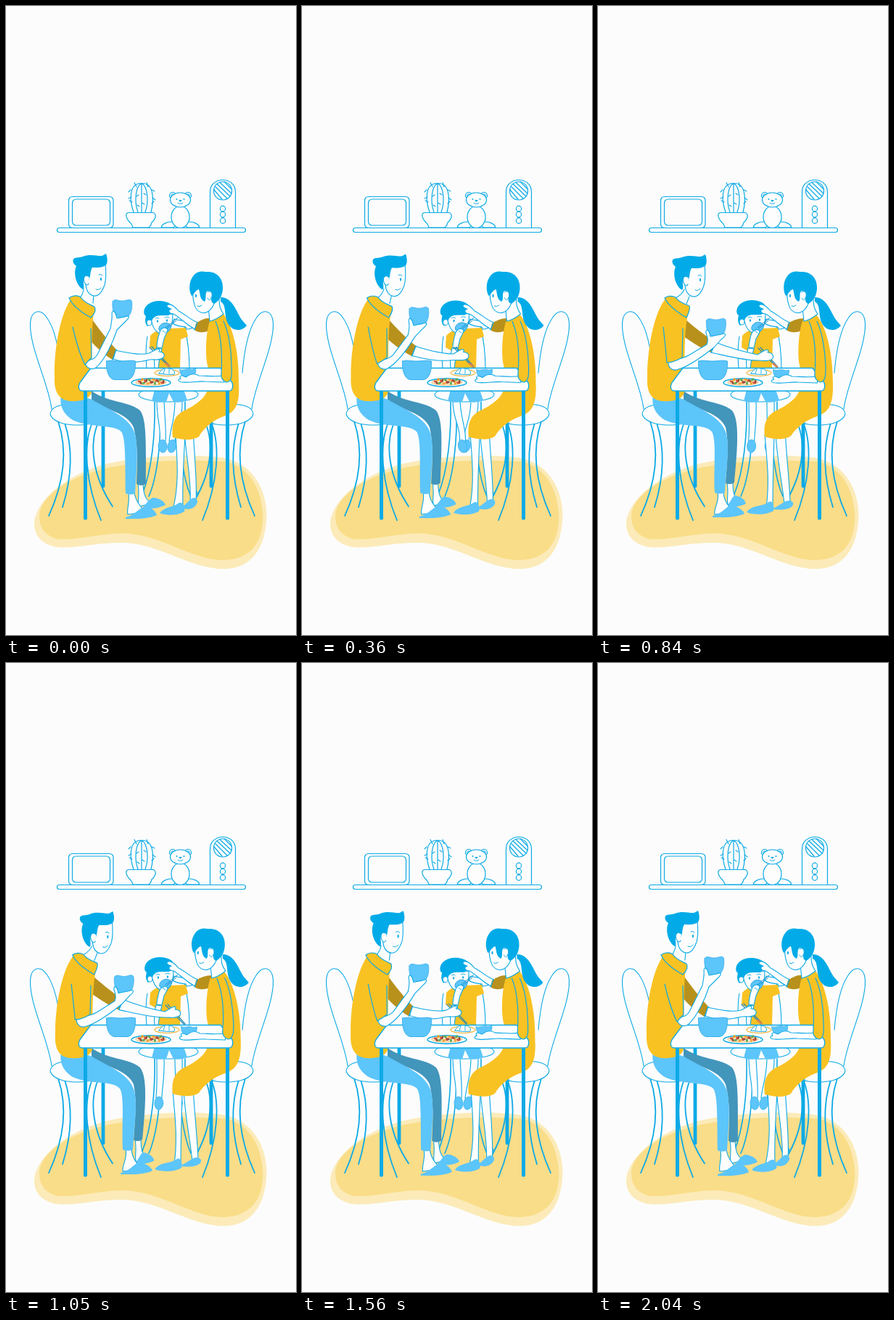
An HTML page with a canvas for the animation above (2070 ms loop, 400 px wide and 866 px high).

```html
<!DOCTYPE html>
<html lang="en">
<head>
<meta charset="utf-8">
<title>Family dinner</title>
<style>
html, body { margin: 0; width: 100%; height: 100%; overflow: hidden; background: #fcfcfc; }
canvas { display: block; width: 400px; height: 866px; }
</style>
</head>
<body>
<canvas id="stage"></canvas>
<script>
const LOOP = 2070;
const LINE = '#0daae6', HAIR = '#02abe8', SKY = '#5cc5fa', STEEL = '#4295bb';
const GOLD = '#f9c223', DARK = '#b8911c', WHITE = '#fdfdfd';
const canvas = document.getElementById('stage'), ctx = canvas.getContext('2d');
const dpr = window.devicePixelRatio || 1;
canvas.width = 400 * dpr;
canvas.height = 866 * dpr;

function ease(t, from, to) {
  const u = Math.min(1, Math.max(0, (t - from) / (to - from)));
  return (1 - Math.cos(Math.PI * u)) / 2;
}
const pulse = (t, a, b, c, d) => ease(t, a, b) * (1 - ease(t, c, d));
const lerp = (a, b, k) => a + (b - a) * k;

// Blend two path strings of the same structure
function mix(a, b, k) {
  const to = b.match(/-?[\d.]+/g);
  let i = 0;
  return a.replace(/-?[\d.]+/g, v => lerp(+v, +to[i++], k).toFixed(2));
}
function paint(path, fill, stroke, width) {
  if (fill) { ctx.fillStyle = fill; ctx.fill(path); }
  if (stroke) { ctx.strokeStyle = stroke; ctx.lineWidth = width; ctx.stroke(path); }
}
function shape(d, fill, stroke, width = 1.2) { paint(new Path2D(d), fill, stroke, width); }
function oval(x, y, rx, ry, fill, stroke, width = 1.2, turn = 0) {
  const p = new Path2D();
  p.ellipse(x, y, rx, ry, turn, 0, 7);
  paint(p, fill, stroke, width);
}
function box(x, y, w, h, r, fill, stroke, width = 1.2) {
  const p = new Path2D();
  p.roundRect(x, y, w, h, r);
  paint(p, fill, stroke, width);
}
const line = (d, width = 1.2, color = LINE) => shape(d, null, color, width);
function shifted(dx, dy, draw) {
  ctx.save();
  ctx.translate(dx, dy);
  draw();
  ctx.restore();
}
function mirrored(axis2, draw) {
  ctx.save();
  ctx.translate(axis2, 0);
  ctx.scale(-1, 1);
  draw();
  ctx.restore();
}

function rug() {
  shape('M39 713C40 680 88 640 150 628C205 617 270 617 305 623C340 632 360 665 359.5 703C358 745 340 775 300 775C255 775 215 742 165 739C125 738 95 748 70 745C50 741 39 730 39 713Z', '#fcebb9');
  shape('M46 703C47 672 92 645 150 634C205 624 260 625 300 627C333 632 353 662 354.5 703C354 742 335 762 300 763C255 763 215 727 160 726C125 727 95 736 72 734C54 730 46 718 46 703Z', '#fadd88');
}

function bearSide() {
  oval(230, 261, 4.5, 4.5, WHITE, LINE);
  oval(230, 261, 2.2, 2.2, null, LINE, 1);
  shape('M229 297C223 297 214 300 214.5 305H230Q236 303 232 299', WHITE, LINE);
}
function shelf() {
  box(86.5, 262.5, 61.5, 43, 5, null, LINE);
  box(91.5, 266, 52, 36, 5, null, LINE);

  line('M176 284C171 270 168 244 187 244C205 244 204 268 200 284M182 284C177 270 178 249 187 244V284M192 284C197 270 196 249 187 244');
  line('M177 243L180 249M172 253L169 256M194 243L196 249M201 253L205 255M173 263L169 265M202 264L206 267M174 270L170 268M201 272L204 269M180 262L183 260M190 258L193 260M188 271L191 273M181 274L184 276', 1.1);
  shape('M169 284.5H203Q207 286 206 291Q204 296 201 298Q199 305 196 305H175Q173 299 170 297Q165 291 166 287Q166 285 169 284.5Z', WHITE, LINE);

  bearSide();
  mirrored(481, bearSide);
  oval(240.5, 290.5, 12.5, 15, WHITE, LINE);
  oval(240.5, 267, 14, 10, WHITE, LINE);
  oval(235.5, 266, 1, 1, LINE);
  oval(245.5, 266, 1, 1, LINE);
  shape('M238 267H243L240.5 270Z', LINE);
  line('M237 271Q240.5 274 244 271', 1);

  line('M281.5 305V256C281.5 234 316.5 234 316.5 256V305');
  oval(299, 254.5, 12.5, 12.5, null, LINE);
  line('M289 249L305 265M291 245L309 262M295 243L311 258M301 242L311 252M287 253L298 266');
  for (const y of [279, 287, 295.5]) oval(299, y, 3.6, 3.8, null, LINE);

  box(70.5, 305.5, 260, 6, 3, WHITE, LINE);
}

function chair() {
  line('M63 555C59 520 32 470 33.5 436C35 418 48 416 57 430C66 443 73 470 76 505', 1.1);
  line('M72 572C82 602 85 645 59 702M81 574C91 605 92 645 78 690M118 576C107 605 109 655 131 708M127 574C115 602 118 645 147 689', 1.8);
  shape('M61 562C62 552 72 548 98 548C125 548 135 555 134 562C132 572 118 577 98 577C80 577 64 572 61 562Z', WHITE, LINE, 1.1);
}
function smallChairLegs() {
  line('M205 545C206 590 201 640 188 672M213 545C215 600 208 650 197 675', 1.6);
}

function kidLeg(x, foot) {
  const f = `${foot - 4} 599`, g = `${foot + 4} 599`;
  shape(`M${x - 5} 543C${x - 5} 570 ${foot - 2} 580 ${f}L${g}C${foot + 5} 580 ${x + 6} 570 ${x + 5} 543Z`, WHITE, LINE, 1.1);
  const lean = (foot - x) / 40;
  oval(foot, 606, 6, 9, SKY, '#3fb4ee', 0.8, -lean);
}
function kidLower(t) {
  const swing = t < 1300 ? Math.sin(t / 1300 * 2 * Math.PI) : 0;
  smallChairLegs();
  mirrored(452, smallChairLegs);
  oval(224, 535, 41, 10, WHITE, LINE, 1.1);
  kidLeg(238, 229 - swing * (swing > 0 ? 3 : 9));
  kidLeg(213, 216 + swing * 5.5);
  shape('M205 528L201 544Q210 547 221 545L225 533L231 545Q240 547 250 543L245 528Z', SKY);
}
function kidUpper(p) {
  line('M195 455C192 470 193 485 194 500M246 440C251 460 253 480 253 500', 1.1);
  shape('M199 454C206 446 216 444 226 444L248 443L251 455L241 459L240 500H205L208 476L198 470Z', GOLD);
  shape('M207 471L215 472C212 482 211 490 210 499H205C204 488 205 478 207 471Z', WHITE, LINE, 1.1);
  shape('M249 445C255 445 262 442 262 438C258 434 243 434 232 431L230 437C235 441 243 441 248 442Z', WHITE, LINE, 1.1);
  shifted(p, -p, () => {
    shape('M199 425C201 441 205 449 213 451C224 452 230 445 230 424Z', WHITE, LINE, 1.1);
    shape('M195 441C191 436 192 431 193 427C188 424 190 414 197 410C205 404 220 405 228 411C231 415 229 423 224 426C213 426 207 425 203 430C200 433 202 439 198 439Z', HAIR);
    oval(197.5, 436, 3.5, 4, WHITE, LINE, 1);
    oval(209, 434, 1.2, 1.7, LINE);
    oval(222, 433, 1.2, 1.7, LINE);
    line('M206 430Q209 428 211 430M219 429Q222 427 225 429', 0.9);
    oval(219, 443, 8.5, 6.5, SKY, '#36a7e0', 1, -0.4);
  });
  line('M220 443L237 429M222 444L235 433', 1, '#168fc5');
  shape(mix('M208 470C208 461 210 455 212 449C214 442 220 442 223 445C222 451 220 453 218 458L215 471Z', 'M208 470C208 463 210 458 211 453C214 444 220 445 223 447C223 452 220 454 218 458L215 471Z', p), WHITE, LINE, 1.1);
  line('M216 447L220 450', 0.9);
}

function dadLegs(r) {
  shape(mix('M182 657C185 675 180 685 184 689L200 685C196 680 190 680 189 657Z', 'M178 657C181 672 176 684 180 687L193 682C190 677 186 675 186 656Z', r), WHITE, LINE, 1.1);
  shape(mix('M189 690C195 684 198 677 204 677C213 678 219 683 220 687C210 692 198 693 189 690Z', 'M178 688C184 682 185 674 190 674C198 676 203 680 204 685C196 690 186 690 178 688Z', r), SKY);
  shape(mix('M118 530C140 546 170 544 185 557C194 569 193 600 193 658Q186 662 180 658C182 620 181 600 176 580C168 560 135 555 118 544Z', 'M118 530C140 546 170 544 185 557C195 570 193 605 188 656Q183 660 176 657C179 620 180 600 176 580C168 560 135 555 118 544Z', r), STEEL);
  shape(mix('M169 670C171 685 166 692 168 700L188 697C191 689 180 689 177 670Z', 'M165 669C168 683 159 692 161 700L182 697C188 690 174 690 173 669Z', r), WHITE, LINE, 1.1);
  shape(mix('M165 704C178 701 184 690 193 689C202 690 207 697 208 701C195 707 175 706 165 706Z', 'M158 702C172 699 177 688 185 687C194 690 201 695 202 699C190 705 169 704 158 704Z', r), SKY);
  shape(mix('M78 528C72 545 76 560 92 570C115 581 150 576 159 586C166 595 164 640 165 671Q172 674 178 671C180 640 183 612 178 589C170 565 140 555 119 542Z', 'M78 528C72 545 76 560 92 570C115 581 147 574 157 586C164 598 159 640 161 670Q168 673 175 670C176 640 182 612 177 589C170 565 140 555 119 542Z', r), SKY);
}

function dadHead(p) {
  shape(mix('M106 382L103 402L122 414L121 394Z', 'M117 384L107 402L126 413L130 396Z', p), WHITE);
  line(mix('M107 388C107 394 105 398 102 402M121 397L120 409', 'M119 390C117 396 112 399 107 402M126 400L122 410', p), 1.1);
  shifted(10 * p, p, () => {
    shape('M137 354C138 365 138 377 136 384C132 395 127 400 121 399C115 398 111 392 110 384L112 357Z', WHITE, LINE, 1.1);
    shape('M92.5 350C93 345 101 347 106 345C115 341 125 344 131 344C134 344 135 342 138 341C141 349 140 357 136 358C130 361 124 360 119 360C116 364 117 372 114 378L107 378C106 382 109 386 106 390C98 386 92 369 97 358C94 356 92 353 92.5 350Z', HAIR);
    shape('M115 373C109 368 106 374 108 380C110 385 113 385 114 382', WHITE, LINE, 1.1);
    oval(131, 376, 1.1, 2.3, LINE);
    line('M128 370Q131 368 133 371M124 390Q128 392 131 388', 1);
  });
}
function dadTorso(p) {
  shape(mix('M91 402C76 420 66 470 67 510C66 530 72 542 88 544C105 545 118 540 118 530L118 496C119 470 118 445 121 421L104 401Z', 'M94 402C78 420 68 470 68 510C67 530 72 542 88 544C108 545 119 540 119 530L119 496C120 470 119 445 125 420L107 401Z', p), GOLD);
}
function dadCollar(p) {
  shape(mix('M87 402C92 398 99 398 103 401C107 408 116 411 122 414C125 419 121 425 117 429C106 423 92 413 87 402Z', 'M92 402C96 399 102 399 107 401C110 407 119 410 126 413C128 418 124 424 122 429C110 422 97 413 92 402Z', p), GOLD, LINE, 1.2);
}
function dadBackArm(h, t) {
  const bx = lerp(198, 221, h), by = lerp(470, 471, h);
  const tx = lerp(225, 247, h), ty = lerp(497, 498, h);
  line(`M${bx} ${by}L${tx} ${ty}M${bx + 3} ${by - 1}L${tx + 1} ${ty - 1}`, 1.2, '#2488b5');
  if (t < 860 || t > 1950) line(`M${tx - 5} ${ty - 5}L${tx} ${ty - 1}`, 2.6, '#e98346');
  shape(mix('M151 474C170 478 185 481 197 478L205 474C210 471 213 472 211 476C217 476 220 480 217 484C212 489 205 486 198 487C180 492 165 492 148 486Z', 'M162 463C185 472 205 477 220 480L230 474C235 472 236 474 234 477C240 477 243 481 241 485C237 490 228 488 221 488C200 488 175 481 156 477Z', h), WHITE, LINE, 1.1);
  shape(mix('M118 430C128 445 142 462 152 473L147 487C138 482 124 470 116 460Z', 'M118 429C130 440 145 452 162 463L156 477C145 473 130 463 118 455Z', h), DARK);
  line(mix('M152 473L147 487', 'M162 463L156 477', h), 1.4);
}
function dadFrontArm(q) {
  shifted(lerp(0, 2.5, q), 26 * q, () =>
    shape('M147 407C150 402 154 406 160 406C167 406 170 402 173.5 406C175 417 172 428 165 429H156C149 428 146 418 147 407Z', SKY, '#42b4ee', 0.8));
  shape(mix('M109 490C110 498 117 502 124 498C136 488 148 462 153 446L164 435C172 428 170 425 164 428L153 430C151 420 147 417 146 423C147 430 145 437 144 444L126 480C121 488 116 486 109 490Z', 'M97 488C96 498 102 502 108 501C125 497 145 482 160 470L170 459C178 453 177 449 170 452L155 455C153 443 148 445 149 450C152 458 152 462 150 466L125 481C115 487 105 486 97 488Z', q), WHITE, LINE, 1.1);
  const sleeve = mix('M92 442C96 460 102 480 109 494C112 490 115 487 118 484L117 444', 'M90 442C92 460 94 478 95 491C102 491 109 488 116 484L117 444', q);
  shape(sleeve, GOLD);
  line(sleeve);
}

function momLegs(r) {
  shape(mix('M246 585C248 620 256 650 254 684L262 682C264 660 260 620 258 584Z', 'M245 585C246 620 254 655 257 686L265 682C264 655 260 620 258 584Z', r), WHITE, LINE, 1.1);
  shape(mix('M242 690C249 687 254 677 260 677C267 680 264 687 258 691C252 694 246 693 242 690Z', 'M240 692C250 689 257 680 265 681C272 683 270 690 262 692C254 694 246 694 240 692Z', r), SKY);
  shape(mix('M234 590C236 625 239 655 231 690L244 689C243 660 245 625 247 590Z', 'M230 590C233 625 237 655 232 690L241 688C241 660 242 625 243 590Z', r), WHITE, LINE, 1.1);
  shape(mix('M212 698C219 689 231 690 237 685C244 680 248 690 246 696C236 702 220 702 212 698Z', 'M205 697C212 687 226 689 234 684C240 678 244 688 242 695C232 701 214 701 205 697Z', r), SKY);
}
function momBackArm(p) {
  shape('M265 436C255 433 247 424 238 420C233 414 228 410 224 411C219 413 224 416 228 417C223 419 224 423 231 424C237 426 243 435 262 446Z', WHITE, LINE, 1.1);
  shape(mix('M282 430C275 429 268 433 262 437L260 446Q268 452 280 447Z', 'M284 430C276 430 268 433 262 437L260 446Q268 452 281 447Z', p), DARK);
  line('M264 436L260 446');
}
function momBody(p) {
  shape(mix('M281 434C287 427 294 424 300 424C312 440 322 475 321 520C323 550 315 560 300 565C285 570 272 582 266 593C255 600 240 596 230 594C228 575 232 563 248 556C264 548 276 538 278 528L280 500C274 490 275 450 281 434Z', 'M282 434C288 427 295 424 301 425C314 440 324 475 324 520C325 550 317 560 302 565C286 570 272 582 266 592C255 599 240 596 230 593C228 575 232 563 248 556C264 548 276 538 278 528L280 500C274 490 276 450 282 434Z', p), GOLD);
}
function momHead(p) {
  shifted(3 * p, 0, () => {
    shape('M279 414L281 434C287 433 295 428 300 424C296 418 294 414 294 402Z', WHITE, LINE, 1.1);
    shape('M296 401C309 401 315 413 321 425C325 433 329 436 332 440C324 450 310 447 305 435C301 424 304 411 296 407Z', HAIR);
    shape('M259 385C257 394 257 402 260 411C262 420 270 425 278 421C287 416 290 404 290 390Z', WHITE, LINE, 1.1);
    shape('M256 399C252 392 252 380 258 372C263 365 270 365 276 366C292 365 300 376 299 390C298 400 294 406 287 410C284 409 283 406 283 404C285 397 281 390 277 393C274 397 277 403 274 407C267 404 268 396 266 390C263 391 260 394 258 398Z', HAIR);
    shape('M278 394C283 390 286 397 283 402C281 406 279 405 278 402', WHITE, LINE, 1);
    oval(262, 399, 1.1, 2.2, LINE);
    line('M264 413Q267 415 270 412', 1);
  });
}
function momFrontArm(p) {
  shifted(1.5 * p, p, () => {
    ctx.save();
    ctx.translate(251, 505);
    ctx.rotate(-0.06 + 0.1 * p);
    shape('M-11 -5C-6 -3 -2 -6 3 -5C7 -3 9 -6 11 -5C11 2 8 6 3 7H-4C-9 5 -11 1 -11 -5Z', SKY, '#42b4ee', 0.8);
    ctx.restore();
    shape('M301 509C288 511 276 509 266 509C260 505 253 507 248 511C241 507 238 510 241 513C236 514 237 518 244 518C255 519 265 516 275 517L301 518Z', WHITE, LINE, 1.1);
  });
  const sleeve = mix('M289 434C298 455 298 485 297 505C296 512 299 517 305 518C313 517 311 503 311 495C311 470 306 446 300 434', 'M291 434C300 455 301 485 299 505C298 512 302 517 307 518C315 517 314 503 314 495C313 470 308 446 302 434', p);
  shape(sleeve, GOLD);
  line(sleeve);
}

function table() {
  shape('M117 498.5H296L312 518.5C314 525 312 530 307 530H106C100 530 99 524 102 518.5Z', WHITE, LINE, 1.3);
}
function dishes() {
  oval(222, 505, 17, 4.5, WHITE, '#f1b43e', 1.2);
  shape('M211 506C214 500 219 498 224 499C230 499 234 503 232 507C225 508 218 507 211 506Z', WHITE, LINE, 1);
  line('M219 500L217 506M225 500L225 506', 0.9);
  oval(200, 518.5, 27, 5.8, WHITE, LINE, 1.5);
  oval(200, 518, 21, 4, '#fff2d7', '#efa34b', 0.8);
  const bits = ['#e4573d', '#55aa50', '#f2a12d', '#92503a'];
  for (let i = 0; i < 18; i++) {
    const x = 184 + i * 1.95, y = 517 + 2.7 * Math.sin(i * 2.4);
    oval(x, y, 2.4, 1.5, bits[i * 3 % 4], null, 0, i);
  }
  shape('M138.5 489C145 487 150 489 158 489C166 489 172 487 178.5 489C179 504 175 514 167 514.5H150C142 514 138 503 138.5 489Z', SKY, '#36b1ed', 1);
}

function draw(now) {
  const t = now % LOOP;
  const body = pulse(t, 0, 720, 900, 1800);
  const bowl = pulse(t, 0, 840, 960, 2000);
  const hand = pulse(t, 0, 720, 960, 1680);
  const feet = pulse(t, 0, 760, 960, 1800);

  ctx.setTransform(dpr, 0, 0, dpr, 0, 0);
  ctx.lineCap = ctx.lineJoin = 'round';
  ctx.fillStyle = '#fcfcfc';
  ctx.fillRect(0, 0, 400, 866);

  rug();
  shelf();
  chair();
  mirrored(402, chair);
  line('M134 530V661M283 530V661', 4.8);
  kidLower(t);
  kidUpper(body);
  momLegs(feet);
  momBackArm(body);
  momBody(body);
  momHead(body);
  dadLegs(feet);
  dadBackArm(hand, t);
  dadTorso(body);
  table();
  dishes();
  dadHead(body);
  dadCollar(body);
  dadFrontArm(bowl);
  momFrontArm(body);
  line('M109.5 532V705M305.5 532V705', 5);

  requestAnimationFrame(draw);
}
requestAnimationFrame(draw);
</script>
</body>
</html>
```
